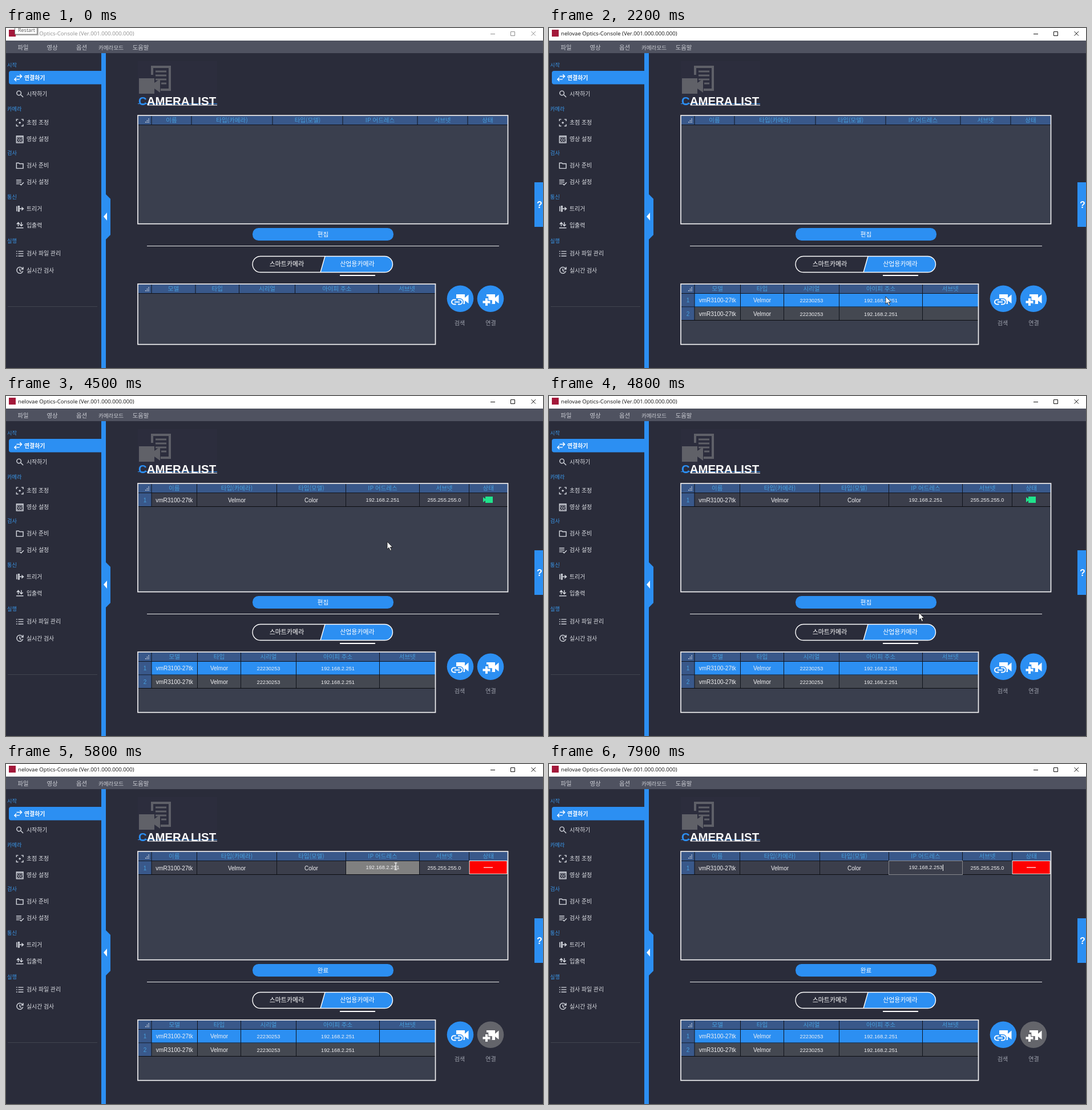
An HTML page that plays this animation: 941x595 px, repeating every 8000 ms.

```html
<!DOCTYPE html>
<html lang="ko">
<head>
<meta charset="utf-8">
<title>Camera list</title>
<style>
html, body { margin: 0; width: 100%; height: 100%; overflow: hidden; background: #2a2c3a; }
svg { display: block; width: 941px; height: 595px; }
text { font-family: "Noto Sans CJK KR", "Noto Sans CJK", sans-serif; white-space: pre; }
.latin { font-family: "Liberation Sans", Arial, sans-serif; }
.title { font-family: "Open Sans", "Noto Sans", sans-serif; }
.icon { fill: none; stroke: #d5d8df; stroke-width: 1.6; }
</style>
</head>
<body>
<svg viewBox="0 0 941 595"><g id="still"></g><g id="live"></g></svg>
<script>
const LOOP = 8000, STEP = 100;
const BLUE = '#2c8ff2', HOVER = '#55a2ef', DARK = '#2a2c3a', PANEL = '#3a3f4e',
      HEAD = '#39588a', HEAD_TEXT = '#479fdd', MAKER = 'Velmor', MODEL = 'vmR3100-27tk';

const rect = (x, y, w, h, fill, more = '') =>
  `<rect x="${x}" y="${y}" width="${w}" height="${h}" fill="${fill}" ${more}/>`;
const path = (d, fill, more = '') => `<path d="${d}" fill="${fill}" ${more}/>`;
const line = (d, color, width = 1, more = '') =>
  path(d, 'none', `stroke="${color}" stroke-width="${width}" ${more}`);
// Text is placed by its vertical centre.
const text = (s, x, y, size, fill, more = '') =>
  `<text x="${x}" y="${y + size * .37}" font-size="${size}" fill="${fill}" ${more}>${s}</text>`;
const centred = (s, x, y, size, fill, more = '') =>
  text(s, x, y, size, fill, 'text-anchor="middle" ' + more);
const DIGIT_SIZE = 9.2;
const cellText = (s, x, y) =>
  centred(s, x, y, /[a-z]/i.test(s) ? 10 : DIGIT_SIZE, '#f2f2f4', 'class="latin"');

// Icons live in a 16 x 16 box.
const ICONS = {
  swap: 'M5 5H15M11.5 1.5L15 5L11.5 8.5M11 11H1M4.5 7.5L1 11L4.5 14.5',
  search: 'M10.5 6A4.2 4.2 0 1 1 2.1 6A4.2 4.2 0 1 1 10.5 6M9.5 9L14.5 14',
  focus: 'M1.5 5V1.5H5M11 1.5H14.5V5M14.5 11V14.5H11M5 14.5H1.5V11M6 8H10M8 6V10',
  pattern: 'M1.5 1.5H14.5V14.5H1.5ZM2 3.5H14M3 7H5M7 7H9M11 7H13M5 9.5H7M9 9.5H11M3 12H5M7 12H9M11 12H13',
  folder: 'M1.5 13.5V3H6L7.5 4.5H14.5V13.5Z',
  check: 'M1 4H11M1 7.5H11M1 11H7M8 11L10.5 13.5L15.5 8.5',
  trigger: 'M2 3V13M5 3H7V13H5ZM7 8H15M11.5 5L15 8L11.5 11',
  transfer: 'M5 10V3M2 6L5 2.5L8 6M11 2V9M8 6.5L11 9.5L14 6.5M1 13H15',
  list: 'M1 3.5H3M5 3.5H15M1 8H3M5 8H15M1 12.5H3M5 12.5H15',
  clock: 'M13.5 5A6 6 0 1 0 14 9M14.5 1.5V5.5H10.5M8 4.5V8.5L11 10'
};
const MENU = [['swap', '연결하기', 87], ['search', '시작하기', 115.5], ['focus', '초점 조정', 165.5],
  ['pattern', '영상 설정', 194.7], ['folder', '검사 준비', 240.5], ['check', '검사 설정', 269.7],
  ['trigger', '트리거', 316], ['transfer', '입출력', 345], ['list', '검사 파일 관리', 394.7],
  ['clock', '실시간 검사', 424]];

function sidebar() {
  let out = rect(167, 44, 8, 551, BLUE) + path('M175 291L183 299V362L175 370Z', BLUE) +
    path('M171 330L177 323V337Z', '#fff') +
    path('M168 75H9Q5 75 5 79V94.500Q5 98.500 9 98.500H168Z', BLUE) + rect(3, 487, 157, 1, '#41444f');
  ['시작', '카메라', '검사', '통신', '실행'].forEach((s, i) => out += text(s, 2, 65 + i * 77, 9.2, '#3a97ea'));
  MENU.forEach(([icon, label, y], i) => {
    const active = i === 0;
    out += `<path class="icon" d="${ICONS[icon]}" transform="translate(${active ? 14 : 17} ${y - 7}) scale(.9)" ${active ? 'style="stroke:#fff"' : ''}/>` +
      text(label, active ? 32 : 36, y, 9.9, active ? '#fff' : '#dfe1e6', active ? 'font-weight="700"' : '');
  });
  return out;
}

function heading() {
  return rect(231, 58, 139, 79, '#2c2d3d') +
    path('M254 66H289V110H271V106H285V70H258V82H254Z', '#5f6068') +
    line('M262 76H281M262 83H281M262 90H281M272 97H281', '#5f6068', 3) +
    path('M233 88H260V96L270 89V113L260 106V115H233Z', '#606168') +
    line('M231 132.5H370', BLUE) + line('M248 135H370', '#fff') +
    `<text class="latin" x="232" y="135" font-size="20.4" font-weight="700" fill="#fff" word-spacing="-2.5"><tspan fill="${BLUE}">C</tspan>AMERA LIST</text>`;
}

function segments() {
  return rect(432, 399.5, 245.5, 28, DARK, 'rx="14"') +
    path('M559 399.5H663.5A14 14 0 0 1 663.5 427.5H551Z', BLUE) +
    line('M559 399.5L551 427.5', '#fff', 1.4) +
    rect(432, 399.5, 245.5, 28, 'none', 'rx="14" stroke="#fff" stroke-width="1.4"') +
    centred('스마트카메라', 492, 413.3, 11, '#fff', 'font-weight="500"') +
    centred('산업용카메라', 615.5, 413.3, 11, '#fff', 'font-weight="500"') +
    rect(585, 432, 62, 2, '#fff');
}

function stillLayer() {
  let out = rect(0, 0, 941, 595, DARK) + rect(0, 0, 941, 22, '#fff') + rect(0, 22, 941, 22, '#4f5260') +
    rect(5, 3, 12, 12, '#a3183a');
  [['파일', 30], ['영상', 81], ['옵션', 132.5], ['카메라모드', 184], ['도움말', 236]].forEach(([s, x]) =>
    out += centred(s, x, 34, s.length > 3 ? 9.6 : 10.4, '#c9cbd2'));
  return out + sidebar() + heading() + segments() +
    rect(926, 270, 15, 78, BLUE) + centred('?', 935, 309.5, 16, '#fff', 'class="latin" font-weight="700"') +
    rect(247, 381, 617, 1, '#e8e8ea') +
    centred('검색', 795, 516.5, 10, '#a0a4af') + centred('연결', 849.5, 516.5, 10, '#a0a4af');
}

// cols holds the column edges; each row is {fill, cells}.
function table(y, bottom, cols, labels, rows, rowHeight) {
  const right = cols[cols.length - 1], top = y + 16;
  const middle = i => (cols[i] + cols[i + 1]) / 2;
  let out = rect(232, y, right - 232, bottom - y, PANEL) + rect(232, y, right - 232, 15, HEAD);
  for (let i = 0; i < 3; i++)
    for (let j = 0; j <= i; j++) out += rect(244 + i * 2.7, y + 10 - j * 2.7, 1.5, 1.5, '#d5dbe6');
  labels.forEach((s, i) => out += centred(s, middle(i), y + 7.5, 10.5, HEAD_TEXT));
  rows.forEach(({ fill, cells }, r) => {
    const rowY = top + r * rowHeight, mid = rowY + rowHeight / 2;
    out += rect(255, rowY, right - 255, rowHeight, fill) + rect(232, rowY, 23, rowHeight, HEAD) +
      centred(r + 1, 243.5, mid, 10, HEAD_TEXT, 'class="latin"');
    cells.forEach((s, i) => out += cellText(s, middle(i), mid));
    out += line(`M232 ${rowY + rowHeight - .5}H${right}`, '#0b0c10');
  });
  const gridEnd = top + rows.length * rowHeight - 1;
  out += line(`M232 ${y + 15.5}H${right}` + cols.slice(0, -1).map(x => `M${x} ${y}V${gridEnd}`).join(''), '#10131b');
  return out + rect(231, y - 1, right - 230.5, bottom - y + 1, 'none', 'stroke="#f0f0f2" stroke-width="1.7"');
}

function cameraTable(t) {
  const connected = t >= 3600, editing = t >= 5500;
  const address = t < 7200 ? '192.168.2.251' : t < 7800 ? '192.168.2.25' : '192.168.2.253';
  const cols = connected ? [255, 334.5, 474.5, 595.5, 724.5, 811.5, 879] : [255, 325, 467, 590, 721, 809, 879];
  const cells = [MODEL, MAKER, 'Color', t >= 5800 ? '' : address, '255.255.255.0'];
  let out = table(154, 342.7, cols, ['이름', '타입(카메라)', '타입(모델)', 'IP 어드레스', '서브넷', '상태'],
    connected ? [{ fill: '#3b3e4b', cells }] : [], 24);
  if (!connected) return out;
  out += editing
    ? rect(812, 169.5, 66, 23, '#fe0000', 'stroke="#f4f4f4"') + rect(837, 180.5, 16, 1.2, '#fff')
    : path('M840 176H853V187H840V183L836 186V177L840 180Z', '#20e38c');
  if (t >= 5800) {
    out += t < 6000 ? rect(596, 170, 128, 23, '#808080')
      : rect(595.5, 169.5, 129, 24, '#3b3e4b', 'stroke="#85868b"');
    out += cellText(address, 660, 181);
  }
  if (t >= 7100) {
    const width = ((address.length - 3) * .556 + 3 * .278) * DIGIT_SIZE;
    out += rect(660.5 + width / 2, 176, 1, 11, '#fff');
  }
  return out;
}

function foundTable(t) {
  const found = t >= 1600, cells = [MODEL, MAKER, '22230253', '192.168.2.251'];
  const cols = found ? [255, 335.5, 411.5, 508.5, 654.5, 752] : [255, 332, 408.5, 506.5, 653, 752];
  const rows = [{ fill: t >= 2200 ? BLUE : '#444851', cells }, { fill: '#444851', cells }];
  return table(449, 553.7, cols, ['모델', '타입', '시리얼', '아이피 주소', '서브넷'], found ? rows : [], 23.5);
}

function buttons(t) {
  const edit = t >= 5000 && t < 5500, search = t >= 1000 && t < 1700, grey = t >= 5500;
  const inset = edit ? 1 : 0;
  const disc = (x, fill, r) => `<circle cx="${x}" cy="473.7" r="${r}" fill="${fill}"/>` +
    path(`M${x - 7} 466H${x + 8}V472L${x + 14.5} 466.5V482L${x + 8} 477V483H${x - 7}Z`, '#fff');
  const symbol = (d, back, width, gap) =>
    line(d, back, width + gap * 2, 'stroke-linecap="square"') + line(d, '#fff', width);
  const searchFill = search ? HOVER : BLUE, connectFill = grey ? '#64656b' : BLUE;
  return rect(432 + inset, 350 + inset, 247 - inset * 2, 22 - inset, edit ? HOVER : BLUE, 'rx="10.5"') +
    centred(t >= 5500 ? '완료' : '편집', 555.5, 361.3, 10.5, '#fff', 'font-weight="500"') +
    disc(796, searchFill, search ? 22.3 : 23.3) +
    symbol('M788.5 475.5H785A4 4 0 0 0 785 483.500H788.500M792 475.5H795.5A4 4 0 0 1 795.500 483.500H792M786 479.5H795', searchFill, 2, 1.5) +
    disc(849, connectFill, 23.3) + symbol('M842 473V486M835.5 479.5H848.500', connectFill, 4, 1.3);
}

function titleBar(t) {
  const active = t >= 1200, ink = active ? '#111' : '#8e8e8e';
  let out = text('nelovae Optics-Console (Ver.001.000.000.000)', 21, 9.5, 9.6, ink, 'class="title"') +
    line('M849 10.5H857M884.5 6.5H891.5V13.5H884.5ZM920.5 6L928 13.5M928 6L920.5 13.5', ink);
  if (t < 300) out += rect(17, 0, 40, 13, '#b5b5b5') + rect(15.5, -2, 39, 13, '#fff', 'stroke="#777"') +
    text('Restart', 21, 3.4, 9, '#575757', 'class="title"');
  return out;
}

// Pointer stops: time, x, y
const STOPS = [[300, 14, 1], [1000, 806, 473], [1600, 806, 473], [2000, 590, 470], [3900, 590, 470],
  [4000, 632, 300], [4100, 560, 190], [4200, 467, 130], [4300, 467, 130], [4400, 600, 175], [4500, 668, 255],
  [4600, 682, 312], [4800, 648, 379], [5100, 619, 363], [5500, 619, 363], [5800, 683, 179],
  [6000, 683, 179], [6400, 694, 184]];

function pointer(t) {
  if (t < 300 || t >= 7100) return '';
  let i = STOPS.findIndex(s => s[0] > t);
  if (i < 0) i = STOPS.length;
  const a = STOPS[i - 1], b = STOPS[i] || a;
  const u = b === a ? 0 : (t - a[0]) / (b[0] - a[0]), e = u * u * (3 - 2 * u);
  const x = a[1] + (b[1] - a[1]) * e, y = a[2] + (b[2] - a[2]) * e;
  const shape = t >= 5800
    ? line('M-2.5 -6H2.5M0 -6V6M-2.5 6H2.5', '#fff', 1.2)
    : path('M0 0V13L3 10.3L5.3 15.5L7.5 14.5L5.2 9.5H9.3Z', '#fff', 'stroke="#111" stroke-width=".8"');
  return `<g transform="translate(${x} ${y})">${shape}</g>`;
}

const still = document.getElementById('still'), live = document.getElementById('live');
still.innerHTML = stillLayer();
let shown = -1;
function frame() {
  const t = Math.floor(performance.now() % LOOP / STEP) * STEP;
  if (t !== shown) {
    live.innerHTML = titleBar(t) + cameraTable(t) + foundTable(t) + buttons(t) + pointer(t);
    shown = t;
  }
  requestAnimationFrame(frame);
}
frame();
</script>
</body>
</html>
```
